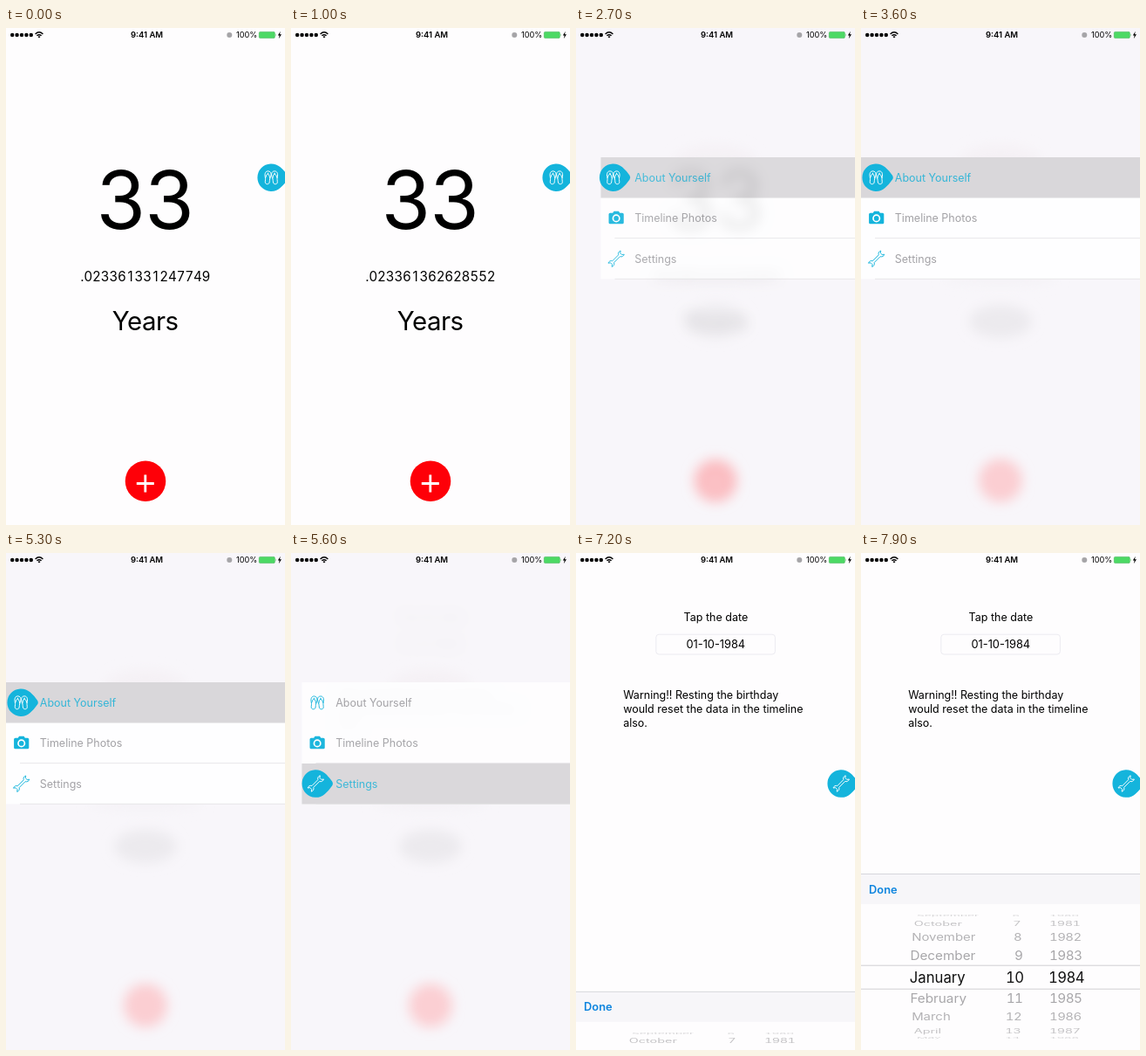
These frames come from a looping animation (320x569 px, 8 s). An HTML page:

```html
<!DOCTYPE html>
<html lang="en">
<head>
<meta charset="utf-8">
<title>Age counter</title>
<style>
html, body { margin: 0; width: 100%; height: 100%; overflow: hidden; background: #fefdfe; }
svg { display: block; width: 100%; height: 100%; }
text { font-family: Inter, Roboto, "Liberation Sans", sans-serif; font-size: 12.5px; }
.tab { font-feature-settings: "tnum"; letter-spacing: -.035em; }
.mid { text-anchor: middle; }
.end { text-anchor: end; }
</style>
</head>
<body>
<svg id="stage" viewBox="0 0 320 569" xmlns="http://www.w3.org/2000/svg"></svg>
<script>
const LOOP = 8000, TEAL = '#14b4dc', PAPER = '#fefdfe';
const ROWS = [171.3, 217.7, 264.2];
const $ = id => document.getElementById(id);
const range = (n, f) => Array.from({ length: n }, (_, i) => f(i)).join('');
const text = (x, y, str, attrs = '') => `<text x="${x}" y="${y}" ${attrs}>${str}</text>`;

const sole = `<path d="M0,-8C4,-8.2 4.6,-3.5 3.2,0C2.4,2 3,4 2.6,6C2,8.4 -2,8.4 -2.4,6
  C-2.8,3.5 -2,2 -3,-.5C-4.4,-5 -3,-8 0,-8ZM-2.6,.6Q-2.2,-3 0,-5Q2.4,-3 2.9,.6M0,-6V-4.5"/>`;
const sandals = `<g fill="none" stroke-width="1" transform="scale(.94)">
  <g transform="translate(-4.4,.2) rotate(5)">${sole}</g>
  <g transform="translate(4.6,.2) rotate(-5) scale(-1,1)">${sole}</g></g>`;
const wrench = `<path transform="rotate(-45) scale(.82)" fill="none" stroke-width="1.1" stroke-linejoin="round"
  d="M-6,-1.6H6C7,-4 10,-4.8 12.2,-3.6L9.6,-1.6V1.6L12.2,3.6C10,4.8 7,4 6,1.6
  H-6C-7,4 -10,4.8 -12.2,3.6L-9.6,1.6V-1.6L-12.2,-3.6C-10,-4.8 -7,-4 -6,-1.6Z"/>`;
const camera = `<path stroke="none" fill="${TEAL}" d="M-7,-6H-4L-2.6,-8H2.8L4.2,-6H7Q8.6,-6 8.6,-4.4V5Q8.6,6.6 7,6.6H-7
  Q-8.6,6.6 -8.6,5V-4.4Q-8.6,-6 -7,-6Z"/><circle cy=".2" r="3.7" fill="${TEAL}" stroke="#fff" stroke-width="1.7"/>`;

const statusBar = `
  ${range(5, i => `<circle cx="${7.2 + 5.4 * i}" cy="8" r="2.2"/>`)}
  <g fill="none" stroke="#000" stroke-width="1.4">
    <path d="M33.6,6.9Q38,2.8 42.4,6.9M35.4,8.8Q38,6.5 40.6,8.8"/></g>
  <path d="M36.5,9.9Q38,8.8 39.5,9.9L38,11.5Z"/>
  ${text(161.5, 11.4, '9:41 AM', 'class="mid" style="font-size:9.5px;font-weight:600"')}
  <circle cx="256.3" cy="8" r="3" fill="#a6a5a8"/>
  ${text(288.3, 11.4, '100%', 'class="end" style="font-size:9.2px"')}
  <rect x="290.3" y="4.4" width="18" height="7.2" rx="1.3" fill="#4cd964" stroke="#45b65a" stroke-width=".6"/>
  <path d="M309,6.5q1.3,1.5 0,3z" fill="#45b65a"/>
  <path d="M314.8,3.8L311.8,8.5H313.7L312.8,12.2L316,7.3H314Z"/>`;

const counterScreen = `
  ${text('131.8 187.4', 229.8, '33', 'class="mid" style="font-size:91.5px"')}
  <text id="count" class="mid" y="290" style="font-size:15.2px"
    x="87.4 ${range(15, i => (94.2 + 9.67 * i).toFixed(2) + ' ')}"></text>
  ${text(159.7, 346.3, 'Years', 'class="mid" style="font-size:29.4px;letter-spacing:-.5px"')}
  <circle cx="160" cy="518.8" r="23.3" fill="#fe0008"/>
  <path d="M149.8,521.5H169.8M159.8,511.5V531.5" stroke="#fff" stroke-width="2.8"/>`;

const line = (y, x = 0, color = '#e2e1e4') => `<path d="M${x},${y}H320" stroke="${color}" stroke-width=".8"/>`;
const at = (y, icon) => `<g transform="translate(17.7,${y})" stroke="${TEAL}">${icon}</g>`;
const menu = `
  <rect width="320" height="569" fill="#f8f6fa"/>
  <g filter="url(#soft)">
    <ellipse cx="160" cy="336" rx="36" ry="19" fill="#eceaee"/>
    <ellipse cx="160" cy="152" rx="46" ry="18" fill="#f5f1f5"/>
    <ellipse cx="160" cy="286" rx="66" ry="8" fill="#f4f2f6"/>
    <circle cx="160" cy="518" r="25" fill="#fbced2"/></g>
  <g id="rows">
    <rect y="148" width="320" height="139.5" fill="#fefeff"/>
    <rect id="pick" width="320" height="46.5" fill="#d9d7da"/>
    ${line(240.6, 16)}${line(287.3, 16)}
    <g id="icon0">${at(ROWS[0], sandals)}</g>
    ${at(ROWS[1], camera)}
    <g id="icon2">${at(ROWS[2], wrench)}</g>
    ${['About Yourself', 'Timeline Photos', 'Settings'].map((s, i) =>
      text(38.8, ROWS[i] + 4.6, s, `id="label${i}"`)).join('')}
  </g>`;

const settings = `
  ${text(160.4, 78.2, 'Tap the date', 'class="mid"')}
  <rect x="91.8" y="93.2" width="136.6" height="22.8" rx="3.4" fill="none" stroke="#ecebf1"/>
  ${text(160.3, 109, '01-10-1984', 'class="mid" style="font-size:12.8px"')}
  ${['Warning!! Resting the birthday', 'would reset the data in the timeline', 'also.'].map((s, i) =>
    text(54.2, 167.3 + 15.7 * i, s)).join('')}`;

// Picker rows lie on a drum: each is turned 20 degrees further from the front.
const MONTHS = ['September', 'October', 'November', 'December', 'January', 'February', 'March', 'April', 'May'];
const drumRow = i => {
  const k = i - 4, a = k * Math.PI / 9, c = Math.cos(a), front = k === 0;
  const size = front ? 16.7 : 15.4 * (1 - 0.13 * (1 - c));
  const cell = (x, s, cls) => text(x, size * 0.364, s, `class="${cls}" style="font-size:${size}px"`);
  return `<g transform="translate(0,${485.5 + 71 * Math.sin(a)}) scale(1,${c})" fill="${front ? '#111' : '#a4a3a6'}"
    opacity="${front ? 1 : 0.3 + 0.7 * c}">
    ${cell(55.8 + 10 * (1 - c), MONTHS[i], '')}
    ${cell(186.6 - 1.2 * Math.abs(k), 10 + k, 'end tab')}
    ${cell(front ? 215 : 216, 1984 + k, 'tab')}</g>`;
};
const picker = `
  <rect y="367" width="320" height="203" fill="${PAPER}"/>
  <rect y="367" width="320" height="35" fill="#f7f6f9"/>
  ${line(367.5, 0, '#cfced3')}
  ${text(9.1, 389.6, 'Done', 'fill="#0d84de" style="font-weight:600;font-size:12.8px"')}
  ${range(9, drumRow)}
  ${line(472.2, 0, '#c6c5c9')}${line(499.2, 0, '#c6c5c9')}`;

$('stage').innerHTML = `
  <defs><filter id="soft" x="-30%" y="-30%" width="160%" height="160%"><feGaussianBlur stdDeviation="7"/></filter></defs>
  <rect width="320" height="569" fill="${PAPER}"/>
  <g id="home">${counterScreen}</g>
  <g id="settings">${settings}</g>
  <g id="menu">${menu}</g>
  <g id="drop" stroke="#fff">
    <path stroke="none" fill="${TEAL}" d="M10.4,-11.9A15.8,15.8 0 1 0 10.4,11.9Q15,8 18.8,2.4Q20.4,0 18.8,-2.4Q15,-8 10.4,-11.9Z"/>
    <g id="dropSandals">${sandals}</g><g id="dropWrench">${wrench}</g></g>
  <g id="picker">${picker}</g>
  <g>${statusBar}</g>`;

const ramp = (t, from, to) => Math.min(1, Math.max(0, (t - from) / (to - from)));
const smooth = p => p * p * (3 - 2 * p);
const easeOut = p => 1 - (1 - p) ** 3;
const fade = (id, v) => { $(id).style.opacity = v; $(id).style.display = v ? '' : 'none'; };

function age(t) {
  const step = Math.floor(t / 100) * 100;
  const n = step < 1000 ? 23361331247749 + 31380.803 * step
    : 23361362628552 + 40617897 * (step - 1000) / 1300;
  return '.0' + Math.round(n);
}

function render(t) {
  const open = smooth(ramp(t, 2350, 2780));
  const close = smooth(ramp(t, 5550, 5980));
  const chosen = t < 5450 ? 0 : 2;
  const shift = open - close;

  $('count').textContent = age(t);
  fade('home', chosen ? 0 : 1);
  fade('settings', chosen ? 1 : 0);
  for (const id of ['home', 'settings']) $(id).style.filter = shift ? `blur(${8 * shift}px)` : 'none';
  fade('menu', shift);
  $('rows').setAttribute('transform', `translate(${320 * (1 - shift)},0)`);
  $('pick').setAttribute('y', chosen ? 241 : 148);
  [0, 1, 2].forEach(i => $('label' + i).setAttribute('fill', i === chosen ? '#35b6d7' : '#a3a2a6'));
  fade('icon0', chosen === 0 ? 0 : 1);
  fade('icon2', chosen === 2 ? 0 : 1);
  fade('dropSandals', chosen === 0 ? 1 : 0);
  fade('dropWrench', chosen === 2 ? 1 : 0);
  $('drop').setAttribute('transform', `translate(${304.2 - 287 * shift},${chosen ? 264 : 171.2})`);

  const up = easeOut(ramp(t, 7150, 7550));
  fade('picker', up > 0 ? 1 : 0);
  $('picker').setAttribute('transform', `translate(0,${203 * (1 - up)})`);
}

const start = performance.now();
function tick() {
  render((performance.now() - start) % LOOP);
  requestAnimationFrame(tick);
}
render(0);
requestAnimationFrame(tick);
</script>
</body>
</html>
```
